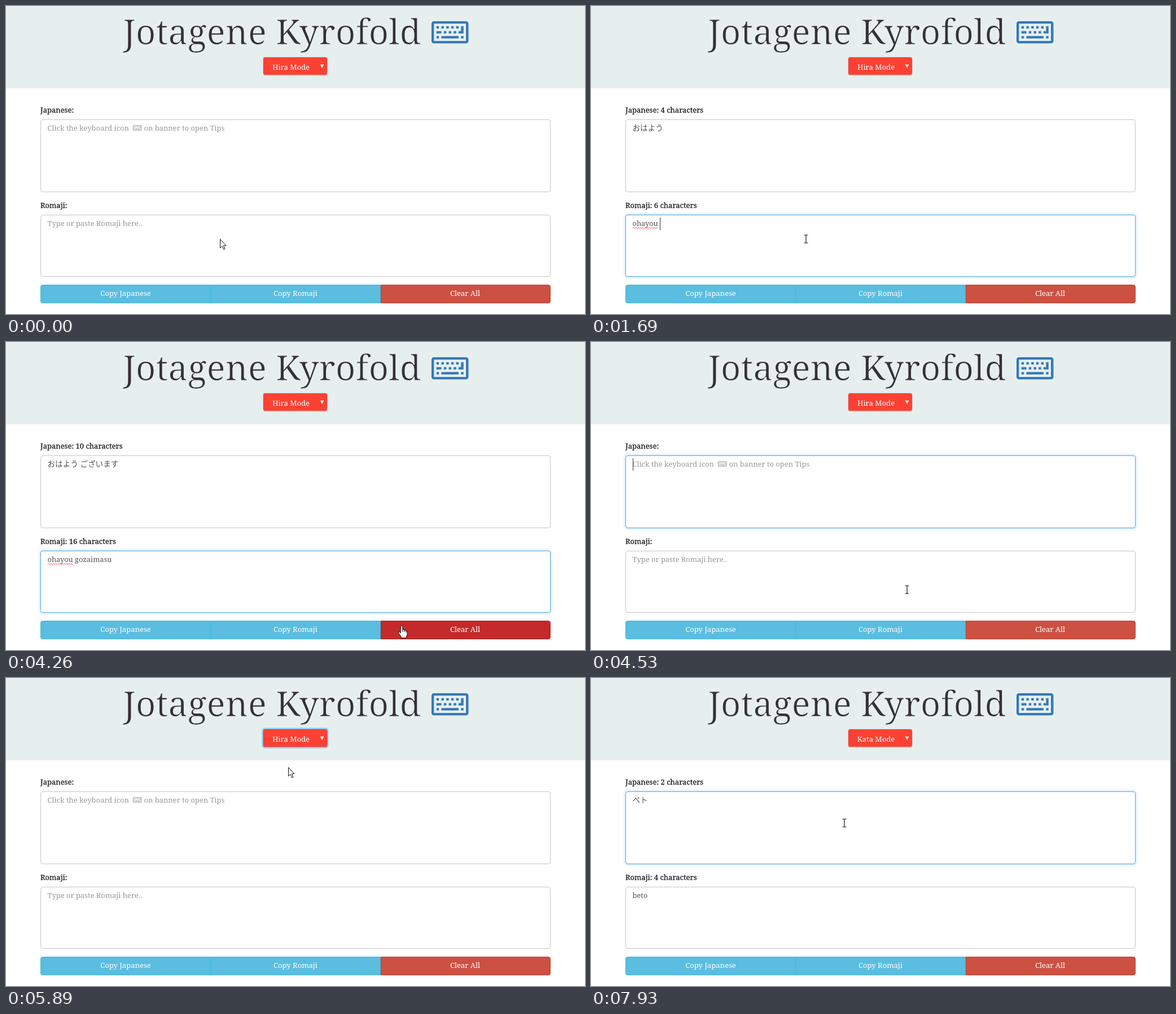
Recreate the animation shown at these times as an HTML page. Size 1026 by 546 pixels, loop 8000 ms.

```html
<!DOCTYPE html>
<html lang="en">
<head>
<meta charset="utf-8">
<title>Jotagene Kyrofold</title>
<style>
  html, body { margin: 0; width: 100%; height: 100%; overflow: hidden; background: #fff; }
  #stage { position: absolute; left: 0; top: 0; width: 1026px; height: 546px; overflow: hidden; }
  #stage > * { position: absolute; box-sizing: border-box; }
  .banner { left: 0; top: 0; width: 1026px; height: 146px; background: #e7efee; }
  .box { left: 61px; width: 904px; border: 1px solid #c6c6c6; border-radius: 4px; background: #fff; }
  #jpBox { top: 201px; height: 129px; }
  #roBox { top: 370px; height: 110px; }
  #mode { left: 455px; top: 90px; width: 115px; height: 33px; background: #fc4132; border: 1px solid #ccc; border-radius: 4px; }
  .btn { top: 494px; height: 33px; width: 302px; background: #5bbddf; border: 1px solid #46b8da; }
  #clear { left: 664px; width: 301px; background: #cc5142; border-color: #c33d2e; border-radius: 0 4px 4px 0; }
  #clear.hover { background: #c52a2a; border-color: #ad2020; }
  svg { left: 0; top: 0; }
  text { font: 12.8px "Noto Serif", "Noto Sans CJK JP", "Noto Sans CJK", serif; white-space: pre; fill: #555; }
  /* a stroke in the banner colour slims the letters */
  .title { font-size: 62px; font-weight: 300; fill: #35303a; text-anchor: middle; stroke: #e7efee; stroke-width: 1.2px; }
  .label { font-size: 13px; fill: #222; stroke: #222; stroke-width: .3px; }
  .hint { font-size: 12.95px; fill: #999; }
  .white { fill: #fff; font-size: 13.05px; text-anchor: middle; }
  #jpText { font-size: 13.6px; font-weight: 300; }
</style>
</head>
<body>
<div id="stage">
  <div class="banner"></div>
  <div id="mode"></div>
  <div id="jpBox" class="box"></div>
  <div id="roBox" class="box"></div>
  <div class="btn" style="left:61px;border-radius:4px 0 0 4px"></div>
  <div class="btn" style="left:362px"></div>
  <div id="clear" class="btn"></div>
  <svg width="1026" height="546" viewBox="0 0 1026 546">
    <defs>
      <g id="keys">
        <rect x="64" y="64" width="1792" height="1024" rx="64" fill="none" stroke="currentColor" stroke-width="128"/>
        <path fill="currentColor" d="M256 256h128v128h-128zM512 256h128v128h-128zM768 256h128v128h-128zM1024 256h128v128h-128zM1280 256h128v128h-128zM1536 256h128v384h-256v-128h128zM256 512h256v128h-256zM640 512h128v128h-128zM896 512h128v128h-128zM1152 512h128v128h-128zM256 768h128v128h-128zM512 768h896v128h-896zM1536 768h128v128h-128z"/>
      </g>
    </defs>
    <text class="title" x="471.5" y="67.5">Jotagene Kyrofold</text>
    <use href="#keys" color="#337ab7" transform="translate(754 27) scale(.0341)"/>
    <text id="modeText" class="white" x="505" y="113"></text>
    <path d="M556.8 103.7h6.6l-3.3 6z" fill="#fff"/>
    <text id="jpLabel" class="label" x="61" y="189"></text>
    <text id="roLabel" class="label" x="61" y="358"></text>
    <g id="jpHint">
      <text class="hint" x="73.5" y="221">Click the keyboard icon</text>
      <use href="#keys" color="#999" transform="translate(225 211.5) scale(.0081)"/>
      <text class="hint" x="244.5" y="221">on banner to open Tips</text>
    </g>
    <text id="roHint" class="hint" x="73.5" y="390">Type or paste Romaji here..</text>
    <text id="jpText" x="73.5" y="221"></text>
    <text id="roText" x="73.5" y="390"></text>
    <path id="squiggle" fill="none" stroke="#f2403c"/>
    <rect id="caret" width="1" height="22" fill="#333"/>
    <text class="white" x="212" y="514">Copy Japanese</text>
    <text class="white" x="513" y="514">Copy Romaji</text>
    <text class="white" x="813.5" y="514">Clear All</text>
    <g id="pointer" stroke-linejoin="round">
      <path id="arrow" d="M.5.5V16L4 12.7l2.6 6 2.4-1-2.6-5.9h4.6z" fill="#fff" stroke="#111"/>
      <path id="beam" d="M-3.5-7h2.5q1 0 1 1V6q0 1-1 1h-2.5M3.5-7H1q-1 0-1 1V6q0 1 1 1h2.5" fill="none" stroke="#111" stroke-width="1.2"/>
      <g id="hand" fill="#fff" stroke="#111">
        <path d="M-1.8 1.5Q0-1.5 1.8 1.5V7Q4 6 5 8Q7.2 7 8 9Q10 8.6 10 11V15Q9.8 18 8.2 19.5V21.5H-.8V19.5L-5.3 13Q-6.3 10.3-4 10.5L-1.8 13Z"/>
        <path d="M1.8 7v4M5 8v3M8 9v3" fill="none"/>
      </g>
    </g>
  </svg>
</div>
<script>
const LOOP = 8000, CLEARED = 4320, KATA_AT = 5950;
const $ = id => document.getElementById(id);

// Key presses and the later moments when each key is converted
const first = {
  text: 'ohayou gozaimasu',
  down: [670, 910, 1000, 1080, 1250, 1600, 1690, 1980, 2110, 2330, 2460, 2600, 2660, 2730, 2800, 2930],
  up: [830, 1000, 1080, 1160, 1340, 1650, 1920, 2050, 2170, 2400, 2530, 2660, 2800, 2890, 2960, 3190]
};
const second = { text: 'beto', down: [6510, 6640, 6750, 7610], up: [6580, 6700, 7020, 7670] };

const kana = { ha: 'は', yo: 'よ', go: 'ご', za: 'ざ', ma: 'ま', su: 'す', be: 'ベ', to: 'ト', o: 'お', u: 'う', i: 'い' };
const syllable = new RegExp(Object.keys(kana).join('|'), 'g');
const toKana = s => s.replace(syllable, m => kana[m]);

const focus = {
  jpBox: [[4320, 5420], [6100, LOOP]],
  roBox: [[120, 4300]],
  mode: [[5420, 6080]]
};
const caretOn = [[150, 570], [670, 3420], [3950, 4250], [4350, 4770], [6100, 7280], [7610, 7930]];

const path = [
  [0, 379, 413], [90, 379, 413], [150, 381, 413], [3400, 381, 413], [3610, 426, 412], [3840, 426, 412],
  [4080, 560, 455], [4220, 701, 503], [4380, 701, 503], [4530, 561, 440], [4655, 394, 304],
  [4770, 390, 298], [4980, 390, 298], [5330, 510, 108], [5560, 510, 108], [5740, 500, 158],
  [5940, 500, 158], [6100, 449, 257], [LOOP, 449, 257]
];

const passed = (times, t) => times.filter(x => x <= t).length;
const within = (spans, t) => spans.some(([a, b]) => t >= a && t < b);
const clamp = x => Math.max(0, Math.min(1, x));
const show = (id, on) => $(id).setAttribute('visibility', on ? 'visible' : 'hidden');
const setText = (id, s) => { if ($(id).textContent !== s) $(id).textContent = s; };
const label = (name, n) => name + ':' + (n ? ` ${n} characters` : '');

function pointerAt(t) {
  const i = path.findIndex(p => p[0] > t);
  const [a, ax, ay] = path[i - 1], [b, bx, by] = path[i];
  const k = (t - a) / (b - a);
  return [ax + (bx - ax) * k, ay + (by - ay) * k];
}

function glow(id, t, base, shadow) {
  const k = Math.max(...focus[id].map(([a, b]) => Math.min(clamp((t - a) / 150), b < LOOP ? clamp(1 - (t - b) / 150) : 1)));
  const mix = base.map((c, i) => Math.round(c + ([92, 172, 226][i] - c) * k));
  $(id).style.borderColor = `rgb(${mix})`;
  $(id).style.boxShadow = `${shadow} rgba(102,175,233,${0.45 * k})`;
}

function typed(t) {
  if (t < CLEARED) {
    const done = first.text.slice(0, passed(first.up, t));
    const jp = toKana(done);
    return { jp, ro: first.text.slice(0, passed(first.down, t)), jpCount: jp.length, roCount: done.length };
  }
  const n = passed(second.up, t), done = second.text.slice(0, n);
  const jp = toKana(done);
  return { jp: jp + second.text.slice(n, passed(second.down, t)), ro: done, jpCount: jp.length, roCount: n };
}

function draw(t) {
  const s = typed(t);
  setText('jpText', s.jp);
  setText('roText', s.ro);
  setText('jpLabel', label('Japanese', s.jpCount));
  setText('roLabel', label('Romaji', s.roCount));
  setText('modeText', t < KATA_AT ? 'Hira Mode' : 'Kata Mode');
  show('jpHint', !s.jp);
  show('roHint', !s.ro);
  show('squiggle', t >= 1690 && t < CLEARED);

  glow('jpBox', t, [198, 198, 198], '0 0 4px 1px');
  glow('roBox', t, [198, 198, 198], '0 0 4px 1px');
  glow('mode', t, [204, 204, 204], '0 0 1px 2px');

  const inJp = t > 4300, field = $(inJp ? 'jpText' : 'roText');
  const width = field.textContent ? field.getComputedTextLength() : 0;
  $('caret').setAttribute('x', Math.round(73.6 + width));
  $('caret').setAttribute('y', inJp ? 206 : 375);
  show('caret', within(caretOn, t));

  const [x, y] = pointerAt(t).map(Math.round);
  const overField = t >= 90 && x > 61 && x < 965 && ((y > 201 && y < 330) || (y > 370 && y < 480));
  const overButton = y >= 494 && y < 527;
  $('pointer').setAttribute('transform', `translate(${x} ${y})`);
  show('beam', overField);
  show('hand', overButton);
  show('arrow', !overField && !overButton);
  $('clear').classList.toggle('hover', overButton && x >= 664);
}

$('squiggle').setAttribute('d', 'M74 394.5' + 'l2-2l2 2'.repeat(11));
const start = performance.now();
function tick() {
  draw((performance.now() - start) % LOOP);
  requestAnimationFrame(tick);
}
tick();
</script>
</body>
</html>
```
